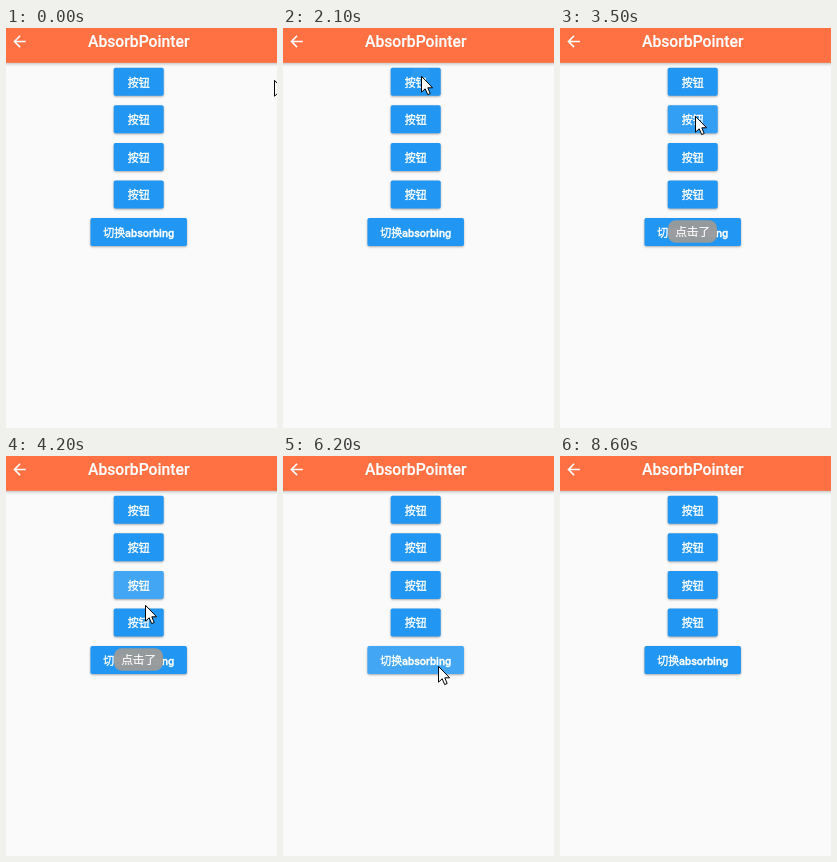
Write an HTML page with a canvas that moves like this. It is 271 px wide and 400 px high and loops after 8900 ms.

```html
<!DOCTYPE html>
<html lang="zh">
<head>
<meta charset="utf-8">
<style>
html, body { margin: 0; width: 100%; height: 100%; overflow: hidden; background: #fafafa; }
canvas { display: block; width: 271px; height: 400px; }
</style>
</head>
<body>
<canvas id="stage"></canvas>
<script>
const W = 271, H = 400, LOOP = 8900, STEP = 100, MID = 132.7;
const FONT = 'Roboto, "Noto Sans CJK SC", "Noto Sans CJK", sans-serif';
const canvas = document.getElementById('stage');
const ctx = canvas.getContext('2d');
const dpr = window.devicePixelRatio || 1;
canvas.width = W * dpr;
canvas.height = H * dpr;

// where the pointer comes to rest: arrival time, x, y
const STOPS = [
  [0, 268, 51], [500, 147, 210], [1720, 138, 47], [2900, 135, 87],
  [3700, 138, 125], [4270, 139, 158], [5000, 165, 207], [5350, 155, 209],
  [6800, 142, 57], [7400, 142, 83], [7800, 142, 128], [8100, 142, 159], [8600, 282, 146]
];

// press time and button index; the last button only toggles and shows no toast
const PRESSES = [[800, 4], [2100, 0], [3100, 1], [3900, 2], [4600, 3], [5900, 4]];
const TOGGLE = 4, BUTTON_H = 28;
const TOAST_DELAY = 100, TOAST_LIFE = 900;

const ARROW = new Path2D('M20 11H7.83l5.59-5.59L12 4l-8 8 8 8 1.41-1.41L7.83 13H20z');
const POINTER = new Path2D('M.5 1.3V17.2L4.2 13.8L6.7 19.6L9.2 18.5L6.8 12.8H11.6Z');

const clamp = v => Math.max(0, Math.min(1, v));
const smooth = k => k * k * (3 - 2 * k);

function pointerAt(t) {
  let [, x, y] = STOPS[0];
  for (const [end, toX, toY] of STOPS.slice(1)) {
    const span = 140 + 1.6 * Math.hypot(toX - x, toY - y);
    const k = smooth(clamp((t - end + span) / span));
    if (k < 1) return [x + (toX - x) * k, y + (toY - y) * k];
    [x, y] = [toX, toY];
  }
  return [x, y];
}

function roundBox(x, y, w, h, r) {
  ctx.beginPath();
  ctx.roundRect(x, y, w, h, r);
}

function text(str, y, size, weight, bold) {
  ctx.font = `${weight} ${size}px ${FONT}`;
  ctx.fillStyle = ctx.strokeStyle = '#fff';
  ctx.lineWidth = bold;
  ctx.lineJoin = 'round';
  ctx.textAlign = 'center';
  ctx.strokeText(str, MID, y);
  ctx.fillText(str, MID, y);
}

function shadow(alpha, blur, dy) {
  ctx.shadowColor = `rgba(0,0,0,${alpha})`;
  ctx.shadowBlur = blur * dpr;
  ctx.shadowOffsetY = dy * dpr;
}

function drawBar() {
  ctx.save();
  shadow(0.25, 3, 1);
  ctx.fillStyle = '#ff7043';
  ctx.fillRect(-10, -10, W + 20, 44.8);
  ctx.restore();
  ctx.save();
  ctx.translate(4.2, 4.1);
  ctx.scale(0.78, 0.78);
  ctx.fillStyle = '#fff';
  ctx.fill(ARROW);
  ctx.restore();
  text('AbsorbPointer', 19, 15.7, 500, 0.2);
}

// ink circle spreading from the pressed point, clipped to the current path
function drawSplash(press, age) {
  const level = clamp((age + 60) / 200) * clamp((500 - age) / 200);
  if (age < 0 || !level) return;
  const [x, y] = pointerAt(press);
  ctx.save();
  ctx.clip();
  ctx.fillStyle = `rgba(255,255,255,${0.15 * level})`;
  ctx.beginPath();
  ctx.arc(x, y, 10 + age * 0.3, 0, 2 * Math.PI);
  ctx.fill();
  ctx.restore();
}

function drawButton(i, t) {
  const y = 39.7 + 37.6 * i;
  const w = i === TOGGLE ? 96.5 : 50;
  ctx.save();
  shadow(0.32, 2.2, 1);
  ctx.fillStyle = '#2196f3';
  roundBox(MID - w / 2, y, w, BUTTON_H, 1.8);
  ctx.fill();
  ctx.restore();
  for (const [press, target] of PRESSES) {
    if (target === i) {
      roundBox(MID - w / 2, y, w, BUTTON_H, 1.8);
      drawSplash(press, t - press);
    }
  }
  text(i === TOGGLE ? '切换absorbing' : '按钮', y + 18.9, 10.95, 500, 0.35);
}

function drawToast(age) {
  if (age <= 0 || age >= TOAST_LIFE) return;
  ctx.save();
  ctx.globalAlpha = 0.96 * clamp(age / 200) * clamp((TOAST_LIFE - age) / 200);
  ctx.fillStyle = '#9b9b9b';
  roundBox(108, 192.2, 49, 22.6, 8);
  ctx.fill();
  text('点击了', 208.1, 11.7, 400, 0.2);
  ctx.restore();
}

function drawPointer(t) {
  const [x, y] = pointerAt(t);
  ctx.save();
  ctx.translate(Math.round(x), Math.round(y));
  ctx.fillStyle = '#fff';
  ctx.strokeStyle = '#000';
  ctx.lineWidth = 1;
  ctx.fill(POINTER);
  ctx.stroke(POINTER);
  ctx.restore();
}

function draw(t) {
  ctx.setTransform(dpr, 0, 0, dpr, 0, 0);
  ctx.fillStyle = '#fafafa';
  ctx.fillRect(0, 0, W, H);
  drawBar();
  for (let i = 0; i <= TOGGLE; i++) drawButton(i, t);
  for (const [press, target] of PRESSES) {
    if (target !== TOGGLE) drawToast(t - press - TOAST_DELAY);
  }
  drawPointer(t);
}

const start = performance.now();
function frame() {
  const t = (performance.now() - start) % LOOP;
  draw(Math.floor(t / STEP) * STEP);
  requestAnimationFrame(frame);
}
frame();
</script>
</body>
</html>
```
